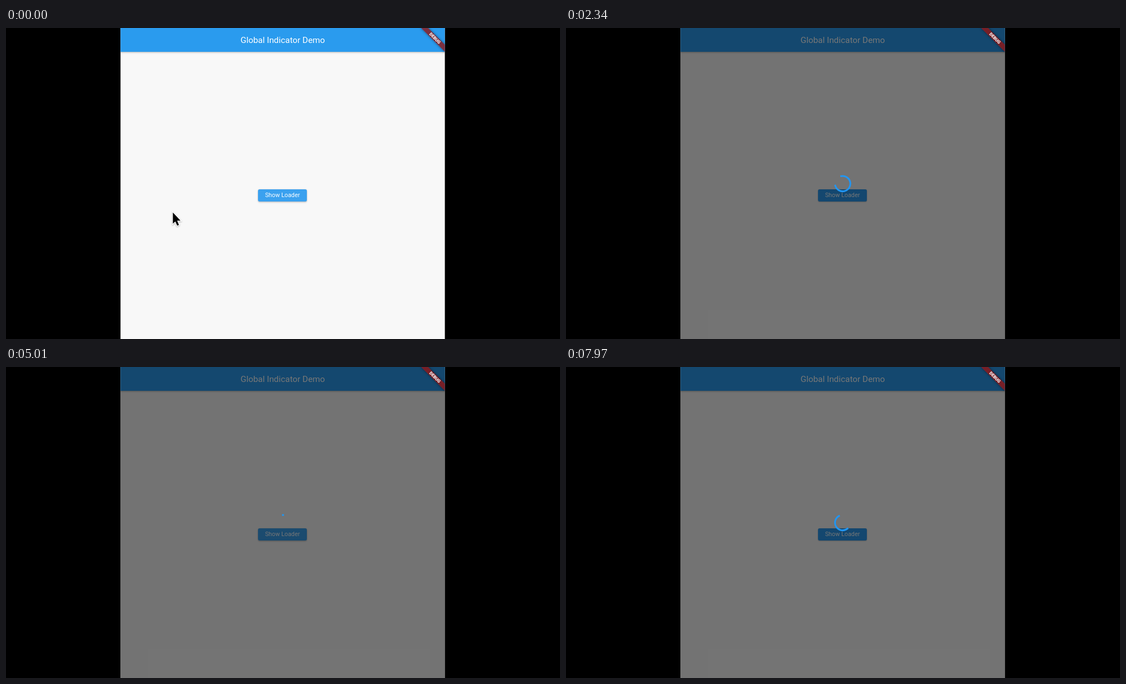
Recreate the animation shown at these times as an HTML page. Size 998 by 561 pixels, loop 8000 ms.

```html
<!DOCTYPE html>
<html lang="en">
<head>
<meta charset="utf-8">
<title>Global Indicator Demo</title>
<style>
  html, body { margin: 0; width: 100%; height: 100%; overflow: hidden; background: #000; }
  body { font-family: Roboto, sans-serif; color: #fff; }
  div { position: absolute; text-align: center; white-space: nowrap; }
  #app {
    left: 206px; top: 0; width: 585px; height: 561px; background: #f8f8f8; overflow: hidden;
    clip-path: inset(0 .4px 0 .3px);
  }
  #bar {
    left: 0; top: 0; width: 585px; height: 43px; background: #2a9bee;
    font-size: 15.36px; line-height: 44px;
    box-shadow: 0 1px 2px rgba(0,0,0,.16), 0 1px 4px rgba(0,0,0,.14);
  }
  #button {
    left: 248px; top: 291px; width: 88px; height: 22px; border-radius: 3px;
    font-size: 10.8px; line-height: 22px;
  }
  #dim { inset: 0; background: rgba(0,0,0,.535); }
  #ribbon {
    left: 535.9px; top: 13.7px; width: 61.2px; height: 9.2px; transform: rotate(45deg);
    background: rgba(144,22,22,.8); box-shadow: 0 0 4.6px rgba(0,0,0,.5);
    font-size: 7.8px; font-weight: 900; line-height: 9.2px;
  }
  svg { position: absolute; left: 0; top: 0; }
</style>
</head>
<body>
<div id="app">
  <div id="bar">Global Indicator Demo</div>
  <div id="button">Show Loader</div>
  <div id="dim"></div>
  <div id="ribbon">DEBUG</div>
</div>
<svg width="998" height="561">
  <path id="spinner" fill="none" stroke="#2196f3" stroke-width="3.07" stroke-linecap="square"/>
  <path id="cursor" d="M300.6 332.8V353L305 348.9L308.4 356.6L311.6 355.2L308.3 347.6H314.4Z"
    fill="#000" stroke="#fff" stroke-width="2.6" paint-order="stroke"
    style="filter:drop-shadow(0 1px 1px rgba(0,0,0,.3))"/>
</svg>
<script>
const LOOP = 8000, CURSOR_HIDES = 1300;
// show/hide: overlay on screen; clock: spinner time zero
const RUNS = [
  { show: 400, clock: 430, hide: 3440 },
  { show: 5010, clock: 5003, hide: LOOP }
];
const CENTER = { x: 498.4, y: 280.8 }, RADIUS = 13.8;
const $ = id => document.getElementById(id);
const clamp = x => Math.min(1, Math.max(0, x));
const ramp = (t, start, length) => clamp((t - start) / length);

// cubic-bezier(.4, 0, .2, 1), solved by bisection
function fastOutSlowIn(x) {
  let lo = 0, hi = 1;
  for (let i = 0; i < 20; i++) {
    const s = (lo + hi) / 2, r = 1 - s;
    if (1.2 * r * r * s + .6 * r * s * s + s ** 3 < x) lo = s; else hi = s;
  }
  return lo * lo * (3 - 2 * lo);
}

function spinnerPath(elapsed) {
  const phase = elapsed / 1333 % 1, turn = elapsed / 2222 % 1;
  const head = fastOutSlowIn(clamp(phase * 2));
  const tail = fastOutSlowIn(clamp(phase * 2 - 1));
  const start = Math.PI * (-.5 + 1.5 * tail + 2 * turn + .5 * phase);
  const sweep = Math.max(1.5 * Math.PI * (head - tail), .03);
  const point = a => `${CENTER.x + RADIUS * Math.cos(a)} ${CENTER.y + RADIUS * Math.sin(a)}`;
  return `M${point(start)}A${RADIUS} ${RADIUS} 0 ${+(sweep > Math.PI)} 1 ${point(start + sweep)}`;
}

// The pointer hovers over the button whenever the overlay is gone
function drawButton(t) {
  let hover = 1;
  for (const run of RUNS) hover += ramp(t, run.hide, 200) - ramp(t, run.show, 200);
  const mix = c => Math.round(c + (255 - c) * .08 * hover);
  const lift = 1 + .4 * hover;
  $("button").style.background = `rgb(${mix(42)},${mix(153)},${mix(238)})`;
  $("button").style.boxShadow =
    `0 ${lift}px ${2 * lift}px rgba(0,0,0,.2), 0 0 ${2 * lift}px rgba(0,0,0,.1)`;
}

function draw(now) {
  const t = now % LOOP;
  const run = RUNS.find(r => t >= r.show && t < r.hide);
  const visibility = on => on ? "visible" : "hidden";
  $("dim").style.visibility = $("spinner").style.visibility = visibility(run);
  $("cursor").style.visibility = visibility(t < CURSOR_HIDES);
  if (run) $("spinner").setAttribute("d", spinnerPath(Math.max(0, t - run.clock)));
  drawButton(t);
}

let origin;
function tick(now) {
  origin ??= now;
  draw(now - origin);
  requestAnimationFrame(tick);
}
draw(0);
requestAnimationFrame(tick);
</script>
</body>
</html>
```
